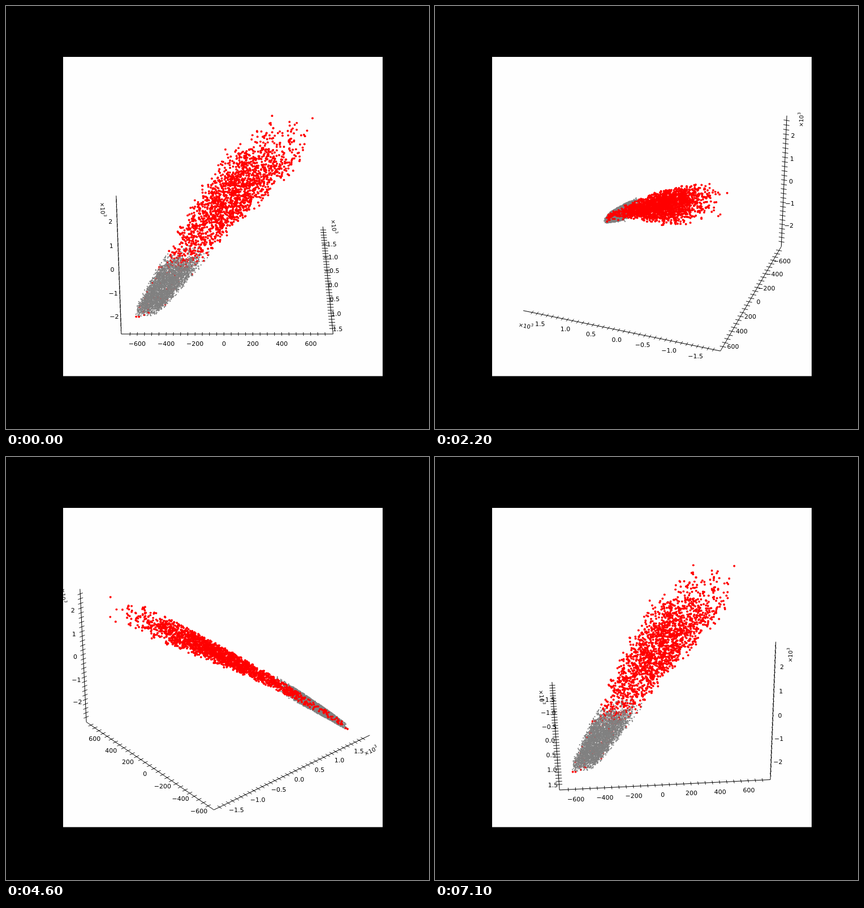
Animation, 748 px wide and 748 px high, one loop 7200 ms. Source, as an HTML page with a canvas:

```html
<!DOCTYPE html>
<html>
<head>
<meta charset="utf-8">
<style>
  html, body { margin: 0; width: 100%; height: 100%; overflow: hidden; background: #000; }
  canvas { display: block; }
</style>
</head>
<body>
<canvas id="stage" width="748" height="748"></canvas>
<script>
const ctx = document.getElementById('stage').getContext('2d');
const STEPS = 72, STEP_MS = 100;
const HALF = 0.5952, HALF_Z = 0.4464;      // half sizes of the drawn box
const CAMERA = 10, FOCAL = 3054, CX = 391.1, CY = 364.8;
const SIN_E = 0.5, COS_E = Math.sqrt(3) / 2;
const TICK = 0.018, LABEL_PAD = 0.033, OFFSET_PAD = 0.0717;
const FONT = 11, POWER_FONT = 10;

// Data value to box coordinate
const toX = v => -0.0181 + v * 0.000812;
const toY = v => -0.0083 - v * 0.3126;
const toZ = v => 0.0166 + v * 0.1533;

let seed = 20;
function random() {
  seed = (seed + 0x6D2B79F5) | 0;
  let n = Math.imul(seed ^ (seed >>> 15), 1 | seed);
  n = (n + Math.imul(n ^ (n >>> 7), 61 | n)) ^ n;
  return ((n ^ (n >>> 14)) >>> 0) / 4294967296;
}
const gauss = () => Math.sqrt(-2 * Math.log(1 - random())) * Math.cos(2 * Math.PI * random());

// A thin wedge that widens with y, is cut by a flat side and thins out at large x
function makeCloud(count, pickY, thickness, focus) {
  const cloud = [];
  while (cloud.length < count) {
    const y = pickY();
    if (y < -0.495 || y > 0.53) continue;
    const width = Math.min(0.27 + 0.36 * y, 0.38);
    const side = random() * (1 - focus) + random() * focus;
    const x = (0.125 - width * side + 0.766 * y) / 0.643;
    if (x > 0.24 + 0.29 * random()) continue;
    const bulge = 0.35 + 1.3 * Math.sqrt(side * (1 - side));
    const z = 0.04 + 0.1 * x + 0.65 * y - 0.25 * y * y
            + thickness * width * bulge * (2 * random() - 1);
    cloud.push([x, y, z]);
  }
  return cloud;
}

function pickRed() {
  if (random() < 0.04) return -0.49 + 0.22 * random();
  let y;
  do y = 0.07 + 0.2 * gauss(); while (y < -0.3);
  return y;
}
const red = makeCloud(1900, pickRed, 0.17, 0.3);
const gray = makeCloud(3700, () => -0.49 + 0.19 * random() + 0.1 * random() * random(), 0.26, 0.2);

let cosA, sinA;
function project([x, y, z]) {
  const toward = x * cosA + y * sinA;
  const scale = FOCAL / (CAMERA - toward * COS_E - z * SIN_E);
  return [CX + (y * cosA - x * sinA) * scale, CY - (z * COS_E - toward * SIN_E) * scale];
}

function line(a, b) {
  ctx.beginPath();
  ctx.moveTo(...project(a));
  ctx.lineTo(...project(b));
  ctx.stroke();
}

function text(str, x, y, size = FONT) {
  ctx.font = `${size}px "DejaVu Sans", sans-serif`;
  ctx.fillText(str, x, y + 0.365 * size);
}

// at(v, pad): point on the axis moved outwards by pad; dir: index of the tick direction
function drawTicks(at, dir, first, last, step, major, format) {
  const count = Math.round((last - first) / step);
  for (let i = 0; i <= count; i++) {
    const v = first + i * step, a = at(v, 0), b = at(v, 0);
    a[dir] -= TICK;
    b[dir] += TICK;
    line(a, b);
    const n = Math.round(v / major);
    if (Math.abs(v - n * major) > step / 4) continue;
    const [x, y] = project(at(v, LABEL_PAD));
    ctx.textAlign = 'center';
    text(format(n * major).replace('-', '\u2212'), x, y + 4.7);
  }
}

function drawPower(anchor, from, to, alignRight) {
  const [ax, ay] = project(from), [bx, by] = project(to);
  ctx.save();
  ctx.translate(...project(anchor));
  ctx.rotate(Math.atan((by - ay) / (bx - ax)));
  ctx.textAlign = 'left';
  const left = alignRight ? -26 : 0;
  text('×10', left, -0.8, POWER_FONT);
  text('3', left + 21.3, -5, POWER_FONT * 0.7);
  ctx.restore();
}

function drawAxes() {
  const sx = cosA > 0 ? 1 : -1, sy = sinA > 0 ? 1 : -1;
  const low = pad => -HALF_Z - 0.75 * pad;
  const xAt = (v, pad) => [toX(v), sy * (HALF + pad), low(pad)];
  const yAt = (v, pad) => [sx * (HALF + pad), toY(v), low(pad)];
  const zAt = (v, pad) => [-sx * (HALF + pad), sy * (HALF + pad), toZ(v)];
  const near = [sx * HALF, sy * HALF, -HALF_Z];
  const xEnd = [-sx * HALF, sy * HALF, -HALF_Z];
  const yEnd = [sx * HALF, -sy * HALF, -HALF_Z];
  const zEnd = [-sx * HALF, sy * HALF, HALF_Z];

  ctx.strokeStyle = ctx.fillStyle = '#000';
  ctx.lineWidth = 1;
  line(near, xEnd);
  line(near, yEnd);
  line(xEnd, zEnd);
  ctx.lineWidth = 0.9;
  drawTicks(xAt, 1, -650, 700, 50, 200, v => String(v));
  drawTicks(yAt, 0, -1.8, 1.7, 0.1, 0.5, v => v.toFixed(1));
  drawTicks(zAt, 1, -2.8, 2.6, 0.2, 1, v => String(v));

  const out = HALF + OFFSET_PAD, opposite = sx !== sy;
  drawPower([sx * out, -sy * HALF, low(OFFSET_PAD)], near, yEnd, opposite);
  drawPower([-sx * out, sy * out, HALF_Z], xEnd, zEnd, !opposite);
}

function drawDots(cloud, color, radius) {
  ctx.fillStyle = color;
  for (const point of cloud) {
    const [x, y] = project(point);
    ctx.beginPath();
    ctx.arc(x, y, radius, 0, 2 * Math.PI);
    ctx.fill();
  }
}

function draw(step) {
  const azimuth = (step * 5 + 90) % 360 - 180;
  cosA = Math.cos(azimuth * Math.PI / 180);
  sinA = Math.sin(azimuth * Math.PI / 180);

  ctx.fillStyle = '#000';
  ctx.fillRect(0, 0, 748, 748);
  ctx.save();
  ctx.beginPath();
  ctx.rect(101, 90, 565, 564.6);
  ctx.clip();
  ctx.fillStyle = '#fefefe';
  ctx.fillRect(101, 90, 565, 565);
  drawAxes();

  // The nearer cloud is painted last
  const layers = [() => drawDots(gray, '#808080', 1.15), () => drawDots(red, '#f00', 1.95)];
  if ((cosA + sinA) * COS_E + 0.38 < 0) layers.reverse();
  layers.forEach(paint => paint());
  ctx.restore();
}

let shown = -1;
function tick() {
  const step = Math.floor(performance.now() / STEP_MS) % STEPS;
  if (step !== shown) draw(shown = step);
  requestAnimationFrame(tick);
}
tick();
</script>
</body>
</html>
```
